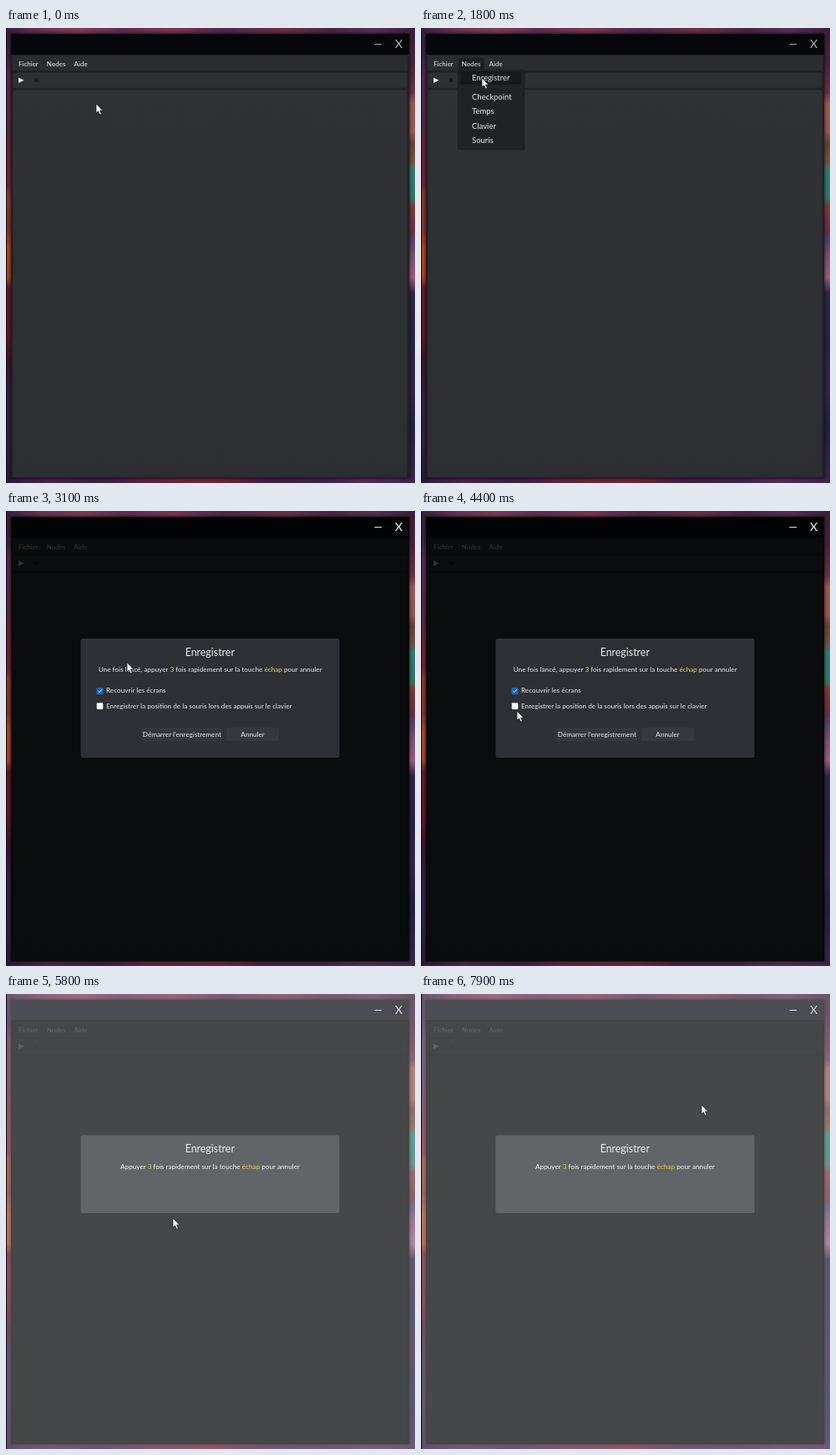
Animation of 490x546 px, one loop 8 s. Source, as an HTML page:

```html
<!DOCTYPE html>
<html lang="fr">
<head>
<meta charset="utf-8">
<title>Enregistrer</title>
<style>
html, body { margin: 0; width: 100%; height: 100%; overflow: hidden; background: #08080b; }
#stage { position: relative; width: 490px; height: 546px; overflow: hidden; }
#stage > * { position: absolute; }

.left { left: 1px; top: 0; width: 7px; height: 546px;
  background: linear-gradient(#38203f, #3b2142 30px, #5c2b4d 60px, #592a48 110px, #6d2438 140px, #7d2434 190px, #91392a 200px,
    #8d3328 240px, #b4461f 265px, #b04320 300px, #6c1728 312px, #691628 370px, #42132f 400px, #38204a 440px, #34204a 500px, #2b1a3a); }
.right { left: 482px; top: 0; width: 8px; height: 546px;
  background: linear-gradient(#3a1f38, #4a2238 40px, #6d3141 78px, #9a5852 90px, #96584f 125px, #6a3f38 138px, #74523d 160px,
    #2d7d6c 170px, #337565 205px, #7c3a3a 214px, #6c2f42 245px, #55406c 255px, #80506f 275px, #9a5a7c 300px, #2f2446 318px,
    #282447 380px, #33244a 430px, #242042 480px, #38264e); }
.top { left: 1px; top: 0; width: 489px; height: 8px;
  background: linear-gradient(90deg, #38203f, #67304d 40px, #7b3a57 90px, #5e2d4d 140px, #7a3350 200px, #4d2846 260px,
    #6a3048 330px, #48263f 390px, #56304e 440px, #3a1f38); }
.bottom { left: 1px; top: 539px; width: 489px; height: 7px;
  background: linear-gradient(90deg, #2b1a3a, #482448 50px, #35203f 110px, #5c2440 170px, #6a2538 250px, #43203f 310px,
    #3b2448 380px, #522c52 430px, #38264e); }
.frame { left: 6px; top: 7px; width: 477px; height: 533px; background: #202124; box-shadow: 0 0 3px 1px rgba(0,0,0,.55); }

svg { left: 0; top: 0; font: 8.2px Lato, "Open Sans", sans-serif; fill: #e9e9ea; }
.bar { font-size: 8px; }
.items { font-size: 9.5px; }
.title { font-size: 12.4px; }
.mid { text-anchor: middle; }
.key { fill: #dcdc46; }

/* Hard switches and cursor travel, all on one 8 s clock */
.menu, .hover, .dialog, .press, .running, .arrow, .hand { animation: 8s step-end infinite; }
.menu, .hover, .dialog, .press, .running, .hand { visibility: hidden; }
.menu { animation-name: menu; }
.hover { animation-name: hover; }
.dialog { animation-name: dialog; }
.press { animation-name: press; }
.running { animation-name: running; }
.arrow { animation-name: arrow; }
.hand { animation-name: press; }
.pointer { animation: travel 8s linear infinite; }
@keyframes menu { 0% { visibility: hidden } 15% { visibility: visible } 26.25%, 100% { visibility: hidden } }
@keyframes hover { 0% { visibility: hidden } 20% { visibility: visible } 26.25%, 100% { visibility: hidden } }
@keyframes dialog { 0% { visibility: hidden } 26.25% { visibility: visible } 72.5%, 100% { visibility: hidden } }
@keyframes press { 0% { visibility: hidden } 66.25% { visibility: visible } 72.5%, 100% { visibility: hidden } }
@keyframes running { 0% { visibility: hidden } 72.5%, 100% { visibility: visible } }
@keyframes arrow { 0% { visibility: visible } 66.25% { visibility: hidden } 72.5%, 100% { visibility: visible } }
@keyframes travel {
  0%, 3% { transform: translate(108px, 91px); animation-timing-function: ease-in-out }
  13%, 16% { transform: translate(62px, 43px); animation-timing-function: ease-in-out }
  22.5%, 27% { transform: translate(73px, 60px); animation-timing-function: ease-in-out }
  38.75% { transform: translate(145px, 182px); animation-timing-function: ease-in-out }
  50% { transform: translate(113px, 221px); animation-timing-function: ease-in-out }
  55%, 58% { transform: translate(115px, 240px); animation-timing-function: ease-in-out }
  68%, 74% { transform: translate(200px, 269px); animation-timing-function: ease-in-out }
  96%, 100% { transform: translate(336px, 133px) }
}
</style>
</head>
<body>
<div id="stage">
  <div class="left"></div>
  <div class="right"></div>
  <div class="top"></div>
  <div class="bottom"></div>
  <div class="frame"></div>

  <svg width="490" height="546" viewBox="0 0 490 546">
    <defs>
      <linearGradient id="panel" x2="0" y2="1">
        <stop stop-color="#303135"/><stop offset="1" stop-color="#2d2e32"/>
      </linearGradient>
    </defs>

    <!-- Window -->
    <rect x="6" y="7" width="477" height="25" fill="#06070b"/>
    <rect x="8" y="33" width="473" height="18" fill="#2b2c30"/>
    <rect x="8.5" y="53.5" width="472" height="18.5" rx="2" fill="#2e2f33" stroke="#27282b"/>
    <rect x="8.5" y="74.5" width="472" height="464" rx="2" fill="url(#panel)" stroke="#292a2d"/>
    <rect class="menu" x="45" y="36" width="31" height="15" fill="#1f2023"/>
    <g class="bar">
      <text x="15" y="46">Fichier</text>
      <text x="48.7" y="46">Nodes</text>
      <text x="81.6" y="46">Aide</text>
    </g>
    <path d="M15 59.6L21.5 62.8L15 66Z"/>
    <rect x="34" y="60.5" width="4.5" height="4.5" rx="1" fill="#18191b"/>

    <!-- Menu -->
    <g class="menu">
      <rect x="44.5" y="50" width="79.5" height="96" rx="1" fill="#212225" stroke="#1b1c1f" stroke-width=".6"/>
      <path d="M48 71.5H120" stroke="#292a2e" stroke-width=".7"/>
    </g>
    <rect class="hover" x="47" y="52" width="73" height="16" fill="#18191c"/>
    <g class="menu items">
      <text x="61" y="63.2">Enregistrer</text>
      <text x="61" y="86.2">Checkpoint</text>
      <text x="61" y="103.4">Temps</text>
      <text x="61" y="120.8">Clavier</text>
      <text x="61" y="138">Souris</text>
    </g>

    <!-- Dimming -->
    <g fill="#010303">
      <rect class="dialog" x="6" y="7" width="477" height="533" opacity=".79"/>
      <rect class="running" x="6" y="7" width="477" height="533" opacity=".79"/>
    </g>

    <!-- Window buttons -->
    <path d="M441.5 19.5H450" stroke="#a2a3a6" stroke-width="1.1"/>
    <text x="470.5" y="24" class="mid" font-size="14" fill="#b0b1b4">X</text>
    <g class="dialog">
      <path d="M441.5 19.5H450" stroke="#d0d1d3" stroke-width="1.1"/>
      <text x="470.5" y="24" class="mid" font-size="14" fill="#d4d5d7">X</text>
    </g>

    <!-- Options dialog -->
    <g class="dialog">
      <rect x="89.5" y="153" width="310" height="143" rx="2.5" fill="#2f3035"/>
      <text class="title mid" x="244.3" y="173.6">Enregistrer</text>
      <text class="mid" x="244.7" y="193.4">Une fois lancé, appuyer <tspan class="key">3</tspan> fois rapidement sur la touche <tspan class="key">échap</tspan> pour annuler</text>
      <rect x="108.5" y="212" width="8" height="8" rx="1.2" fill="#1269be"/>
      <path d="M110.4 216L112 217.6L114.8 214.2" fill="none" stroke="#b9d8f2"/>
      <text x="120" y="218.4">Recouvrir les écrans</text>
      <rect x="108.7" y="230.3" width="7.6" height="7.6" rx="1.2" fill="#f4f4f4"/>
      <text x="120" y="237.2">Enregistrer la position de la souris lors des appuis sur le clavier</text>
      <rect x="162.5" y="260" width="96.5" height="16" rx="2" fill="#36373c"/>
      <rect x="264.5" y="260" width="62.5" height="16" rx="2" fill="#37383d"/>
    </g>
    <rect class="press" x="162.5" y="260" width="96.5" height="16" rx="2" fill="#4e5056"/>
    <g class="dialog mid">
      <text x="210.8" y="271.2">Démarrer l'enregistrement</text>
      <text x="295.6" y="271.2">Annuler</text>
    </g>

    <!-- Recording overlay -->
    <g class="running">
      <rect x="1" width="489" height="546" fill="#fff" opacity=".245"/>
      <rect x="6" y="7" width="477" height="24.5" fill="#4c4d52"/>
      <path d="M441.5 19.5H450" stroke="#d6d7d9" stroke-width="1.1"/>
      <text x="470.5" y="24" class="mid" font-size="14" fill="#d8d9db">X</text>
      <rect x="89.5" y="169.5" width="310" height="93.5" rx="2.5" fill="#636468"/>
      <text class="title mid" x="244.3" y="190.2">Enregistrer</text>
      <text class="mid" x="244.5" y="209.8" fill="#f4f4f4">Appuyer <tspan class="key">3</tspan> fois rapidement sur la touche <tspan class="key">échap</tspan> pour annuler</text>
    </g>

    <!-- Pointer -->
    <g class="pointer" fill="#fff" stroke="#17181a" stroke-width=".7" stroke-linejoin="round">
      <path class="arrow" d="M0 0V11L2.5 8.8L4.4 13L6.3 12.1L4.4 8.1H7.8Z"/>
      <path class="hand" d="M-.7 1Q.3-.7 1.3 1V5Q2.4 4.2 3.1 5.2Q4.2 4.5 4.9 5.6Q6.6 5.2 6.8 7V9.2Q6.6 11 5.6 13H.6Q-1 10.8-3 8.2Q-3.2 6.5-.7 8Z"/>
    </g>
  </svg>
</div>
</body>
</html>
```
